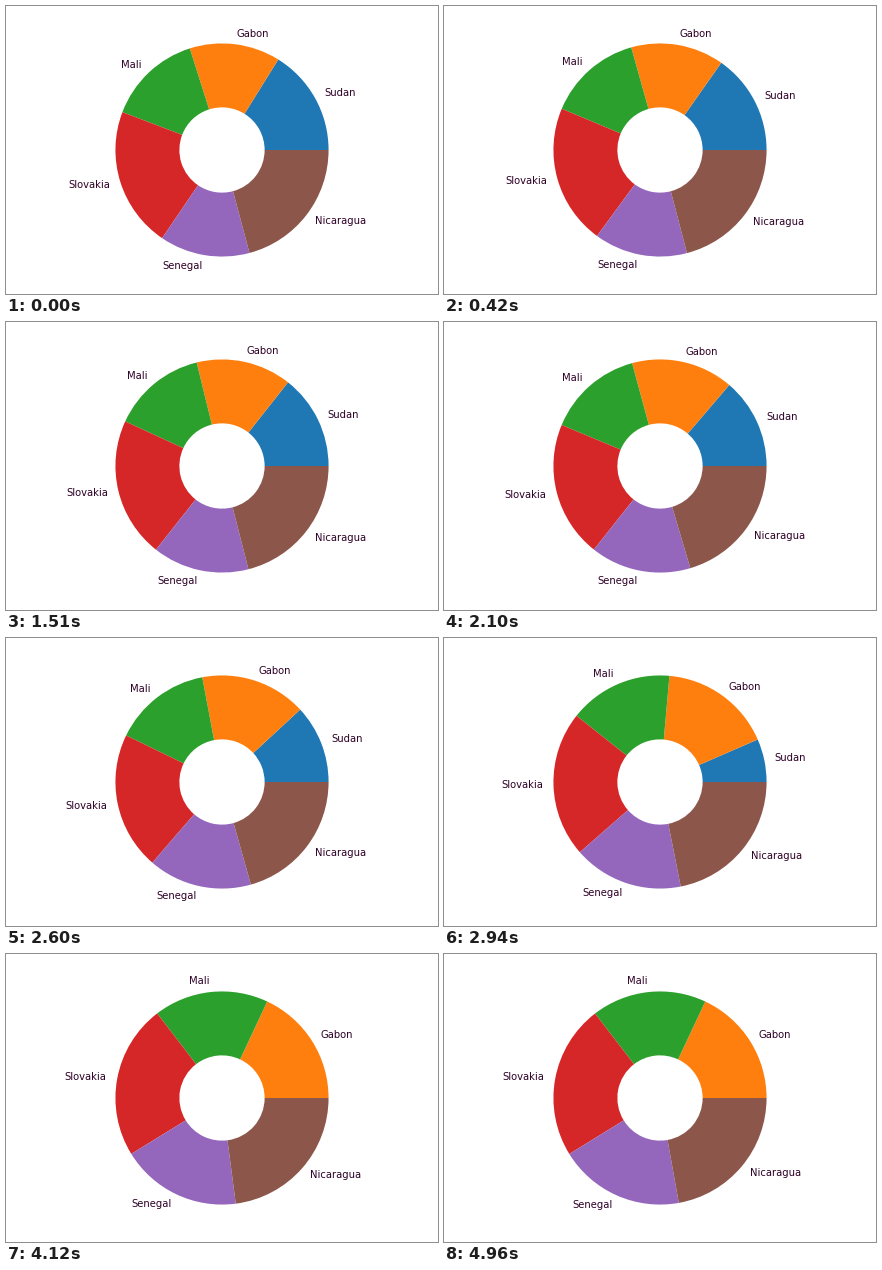
A matplotlib script that plays this animation: 432x288 px, repeating every 5.01 s.

```python
import numpy as np
import matplotlib.pyplot as plt
from matplotlib.animation import FuncAnimation
from matplotlib.patches import Wedge

W, H, DPI = 432, 288, 72
LOOP, TICK = 5010, 10        # ms
STEP, LAST = 42, 118         # ms per pose, last pose

CX, CY = W / 2, H / 2
R = 106.56
HOLE = 0.4 * R
LABEL_R = 1.1 * R

START = {"Sudan": 56.3, "Gabon": 47.9, "Mali": 50,
         "Slovakia": 74.2, "Senegal": 47.6, "Nicaragua": 72.7}

# Each weight ramps linearly: (first pose, last pose, change)
RAMPS = {
    "Sudan": [(0, 20, -6.1), (46, 60, -2.8), (60, 78.6, -47.4)],
    "Gabon": [(0, 20, 2.6), (40, 53, 6.7)],
    "Mali": [(40, 53, 2.8), (79, 99, 2.5)],
    "Senegal": [(0, 20, 3.5), (40, 53, 4.8), (79, 99, 2.2), (99, 118, 2.3)],
    "Nicaragua": [(0, 20, 0.7), (93, 118, -3)],
}

plt.rcParams["font.family"] = "DejaVu Sans"
fig = plt.figure(figsize=(W / DPI, H / DPI), dpi=DPI, facecolor="white")
ax = fig.add_axes([0, 0, 1, 1])
ax.set_xlim(0, W)
ax.set_ylim(0, H)
ax.axis("off")

wedges = [
    ax.add_patch(Wedge((CX, CY), R, 0, 60, width=R - HOLE,
                       facecolor=f"C{i}", linewidth=0))
    for i in range(len(START))
]
labels = [ax.text(CX, CY, name, fontsize=10, color="#2d0026", va="center")
          for name in START]


def weight(name, pose):
    total = START[name]
    for first, last, change in RAMPS.get(name, []):
        total += change * min(max((pose - first) / (last - first), 0), 1)
    return total


def shares(pose):
    w = np.array([weight(name, pose) for name in START])
    return 360 * w / w.sum()


def update(i):
    pose = min((i * TICK + 5) // STEP, LAST)
    start = 0.0
    for size, wedge, label in zip(shares(pose), wedges, labels):
        shown = size > 1e-6
        wedge.set_visible(shown)
        label.set_visible(shown)
        if not shown:
            continue
        wedge.set_theta1(start)
        wedge.set_theta2(start + size)
        mid = np.radians(start + size / 2)
        x, y = LABEL_R * np.cos(mid), LABEL_R * np.sin(mid)
        label.set_position((CX + x, CY + y))
        label.set_ha("left" if x > 0 else "right")
        start += size
    return wedges + labels


anim = FuncAnimation(fig, update, frames=LOOP // TICK, interval=TICK,
                     init_func=lambda: update(0), repeat=True, repeat_delay=0)
plt.show()
```
